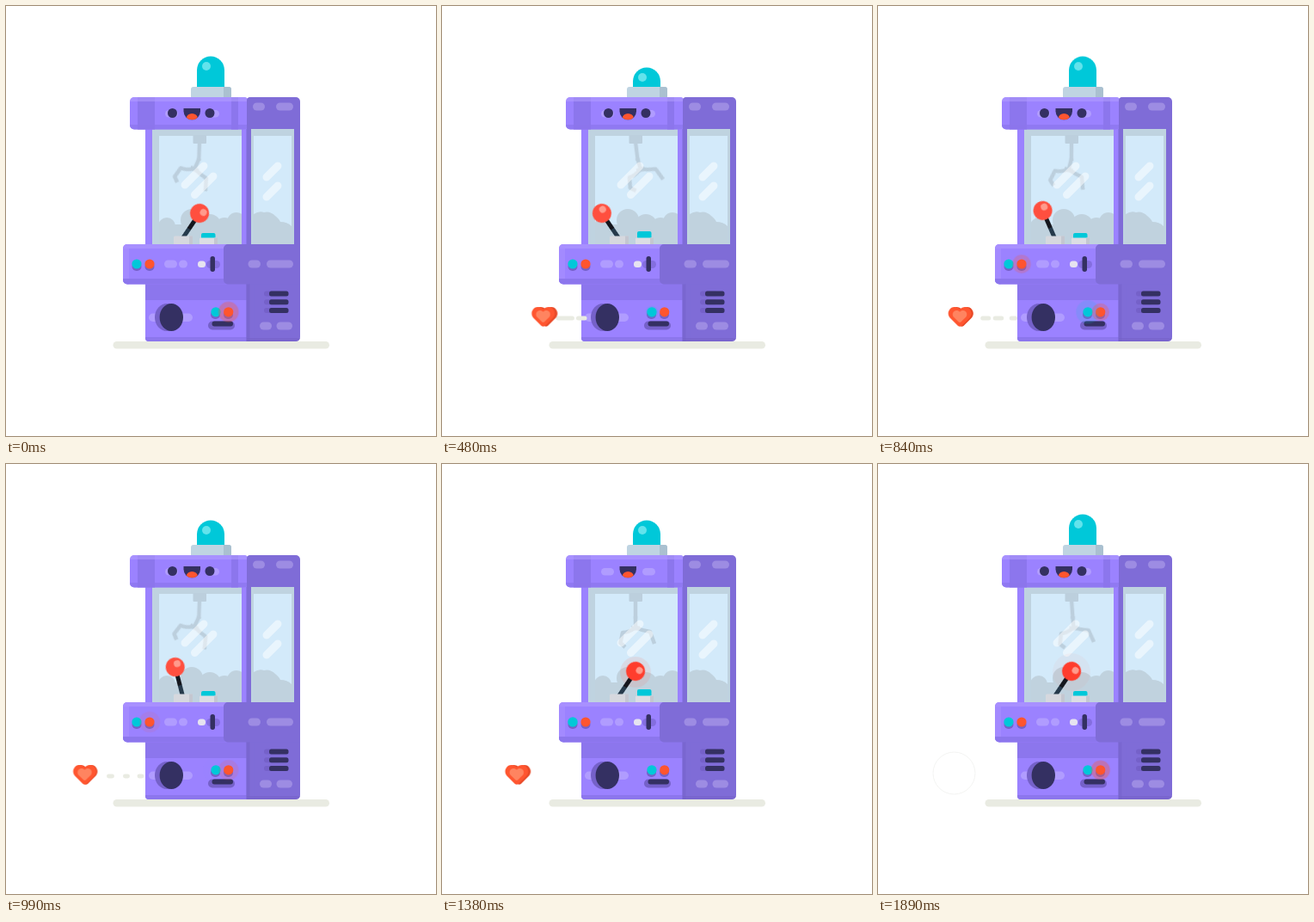
An HTML page without scripts that plays this animation: 500x500 px, repeating every 1.92 s.

```html
<!DOCTYPE html>
<html lang="en">
<head>
<meta charset="utf-8">
<title>Claw machine</title>
<style>
html, body { margin: 0; width: 100%; height: 100%; overflow: hidden; background: #fff; }
svg { display: block; width: 100vw; height: 100vh; }

.lit { fill: #9b82ff; }
.mid { fill: #8c76ed; }
.side { fill: #7f6cd7; }
.shade { fill: #7561c9; }
.pill { fill: #b09cff; }
.dim { fill: #9d8ce3; }
.ink { fill: #343062; }
.cyan { fill: #00c8d9; }
.red { fill: #ff552f; }
.frame { fill: #bfd3e0; }
.glass { fill: #d3eafa; }
.shine { stroke: #fff; stroke-width: 9; stroke-linecap: round; opacity: .5; }
.trail { stroke: #e9ebe2; stroke-linecap: round; stroke-width: 0; }

.dome, .eyes, .stick, .cable, .claw, .cap, .heart, .pop, .ring, .front, .glow, .halo, .ball {
  animation: 1.92s linear infinite;
}
.dome { animation-name: dome; animation-timing-function: ease-in-out; }
.eyes { animation-name: blink; transform-origin: 215px 124.5px; }
.stick { animation-name: stick; transform-origin: 205.5px 270px; animation-timing-function: ease-in-out; }
.ball { animation-name: ball; }
.halo { animation-name: halo; transform-origin: 225px 242px; opacity: 0; }
.cable { animation-name: cable; transform-origin: 225px 158px; animation-timing-function: ease-in-out; }
.claw { animation-name: claw; transform-origin: 225px 178px; animation-timing-function: ease-in-out; }
.cap { animation-name: cap; }
.heart { animation-name: heart; }
.pop { animation-name: pop; }
.front { animation-name: front; }
.ring { animation-name: ring; transform-origin: 88px 359.5px; }
.glow { opacity: 0; animation-name: glow; transform-box: fill-box; transform-origin: center; }

@keyframes dome {
  0% { transform: translateY(0); }
  16% { transform: translateY(16.5px); }
  25% { transform: translateY(13px); }
  35.94% { transform: translateY(5px); }
  43% { transform: translateY(0); }
  51.56% { transform: translateY(7px); }
  60% { transform: translateY(13px); }
  71.88% { transform: translateY(7px); }
  82%, 100% { transform: translateY(0); }
}
@keyframes blink {
  0%, 66% { transform: scaleY(1); }
  70%, 73% { transform: scaleY(0); }
  77%, 100% { transform: scaleY(1); }
}
@keyframes stick {
  0% { transform: rotate(34deg); }
  14.06% { transform: rotate(-25deg); }
  25% { transform: rotate(-34deg); }
  35.94% { transform: rotate(-32.5deg); }
  51.56% { transform: rotate(-14.5deg); }
  68%, 100% { transform: rotate(34deg); }
}
@keyframes ball {
  0%, 62% { fill: #ff4f3f; }
  70%, 98.5% { fill: #ff3d2d; }
  100% { fill: #ff4f3f; }
}
@keyframes halo {
  0%, 66% { opacity: 0; transform: scale(.5); }
  72% { opacity: .13; transform: scale(.9); }
  98.4% { opacity: .05; transform: scale(1.1); }
  100% { opacity: 0; transform: scale(1.1); }
}
@keyframes cable {
  0% { transform: rotate(2deg); }
  14.06% { transform: rotate(-4deg); }
  25% { transform: rotate(-7deg); }
  35.94% { transform: rotate(-2deg); }
  50% { transform: rotate(2deg); }
  71.88% { transform: rotate(0); }
  85% { transform: rotate(-5deg); }
  98.43%, 100% { transform: rotate(-4deg); }
}
@keyframes claw {
  0% { transform: rotate(22deg); }
  14.06% { transform: rotate(-1deg); }
  25% { transform: rotate(-9deg); }
  35.94% { transform: rotate(0); }
  50% { transform: rotate(24deg); }
  71.88% { transform: rotate(0); }
  85% { transform: rotate(-4deg); }
  98.43%, 100% { transform: rotate(-1deg); }
}
@keyframes cap {
  0%, 16% { transform: translateY(0); }
  24%, 28% { transform: translateY(-2px); }
  34%, 64% { transform: translateY(0); }
  71%, 77% { transform: translateY(-2px); }
  84%, 100% { transform: translateY(0); }
}
@keyframes heart {
  0%, 6.25% { transform: translate(191px, 361px); }
  9.38% { transform: translate(173px, 361px); }
  14.06% { transform: translate(151.5px, 361px); }
  17.97% { transform: translate(137px, 361px); }
  21.88% { transform: translate(126.5px, 361px); }
  25% { transform: translate(119.5px, 361px); }
  28.13% { transform: translate(114px, 361px); }
  35.94% { transform: translate(102.5px, 361px); }
  43.75% { transform: translate(96px, 361px); }
  51.56% { transform: translate(91.5px, 361px); }
  56.25% { transform: translate(90px, 361px); }
  71.88%, 100% { transform: translate(88.3px, 361px); }
}
@keyframes pop {
  0%, 6.25% { transform: scale(0); }
  12.5%, 76% { transform: scale(1); }
  79% { transform: scale(1.12); }
  84%, 100% { transform: scale(0); }
}
@keyframes front {
  0%, 35.94% { transform: translateX(-1.8px); }
  51.56% { transform: translateX(0); }
  71.88%, 100% { transform: translateX(-1.5px); }
}
@keyframes ring {
  0%, 79% { opacity: 0; transform: scale(.3); }
  80% { opacity: 1; transform: scale(.5); }
  84.4% { opacity: .9; transform: scale(.85); }
  98.44% { opacity: .45; transform: scale(1); }
  100% { opacity: 0; transform: scale(1); }
}
@keyframes glow {
  0% { opacity: 0; transform: scale(.4); }
  6% { opacity: .4; transform: scale(.6); }
  14% { opacity: .28; transform: scale(.85); }
  30%, 100% { opacity: 0; transform: scale(1.1); }
}
</style>
</head>
<body>
<svg viewBox="0 0 500 500" xmlns="http://www.w3.org/2000/svg">
  <defs>
    <path id="love" d="M-2 11 L-11.5 1.5 C-16 -4 -11.5 -11 -6.5 -11 C-3.5 -11 -1.5 -10 0 -8 C1.5 -10 3.5 -11 6.5 -11 C11.5 -11 16 -4 11.5 1.5 L2 11 Q0 12.6 -2 11Z"/>
    <clipPath id="above"><rect x="210" y="50" width="60" height="45"/></clipPath>
    <clipPath id="mouth"><path d="M206.5 119h19.5v3.5a9.75 9.75 0 0 1-19.5 0z"/></clipPath>
    <clipPath id="pane"><rect x="178" y="151" width="96" height="126"/></clipPath>
    <clipPath id="head"><rect x="144" y="106" width="138" height="37.5" rx="5"/></clipPath>
    <clipPath id="panel"><rect x="136" y="277" width="124" height="46.5" rx="5"/></clipPath>
  </defs>

  <rect x="124.500" y="390" width="251.500" height="8.500" rx="4.250" fill="#e9ebe2"/>

  <!-- lamp -->
  <g clip-path="url(#above)">
    <g class="dome">
      <path class="cyan" d="M222 120V74.500a16 16 0 0 1 32 0V120z"/>
      <circle cx="233" cy="70" r="5" fill="#62e3ec"/>
    </g>
  </g>
  <rect x="215" y="94" width="47" height="16" rx="3" fill="#bfd4e2"/>
  <path d="M253 94h6a3 3 0 0 1 3 3v12h-9z" fill="#aac0d0"/>

  <!-- cabinet -->
  <rect class="lit" x="162" y="130" width="124" height="260" rx="4"/>
  <rect class="mid" x="162" y="323" width="118" height="19"/>
  <path class="mid" d="M162 385h118v5h-114a4 4 0 0 1-4-4z"/>
  <rect class="side" x="280" y="106" width="62" height="284" rx="5"/>
  <rect class="side" x="279.500" y="143" width="10" height="247"/>
  <rect class="shade" x="279.500" y="323" width="4" height="67" opacity=".5"/>
  <path class="shade" d="M280 386h62a5 5 0 0 1-5 4h-57z" opacity=".6"/>

  <!-- windows -->
  <rect class="frame" x="170" y="143" width="104" height="134"/>
  <rect class="glass" x="178" y="151" width="96" height="126"/>
  <rect class="frame" x="285" y="143" width="50" height="134"/>
  <rect class="glass" x="288" y="151" width="44" height="126"/>
  <g fill="#c0d2de">
    <g clip-path="url(#pane)">
      <circle cx="187" cy="256" r="10"/>
      <circle cx="216" cy="249" r="13"/>
      <circle cx="237" cy="255" r="13"/>
      <circle cx="254" cy="257" r="11"/>
      <circle cx="268" cy="251" r="11"/>
      <rect x="178" y="254" width="96" height="23"/>
    </g>
    <path d="M288 242q6-4 12-2q7-2 13 4q5 4 6 7q8 0 13 5v21h-44z"/>
  </g>

  <g fill="none" stroke="#bccfdd" stroke-width="4.500" stroke-linejoin="round">
    <g class="cable">
      <path d="M225 158V180"/>
      <g class="claw">
        <path d="M225 177V190M213 213L207.500 208L210 196Q217 196 225 190Q233 194 242 195L247 209"/>
        <path d="M220 191h10" stroke-width="5"/>
      </g>
    </g>
  </g>
  <rect x="217.500" y="150" width="15.500" height="10" rx="1" fill="#bccfdd"/>
  <g class="shine">
    <path d="M208 208L230 186M219.500 219.500L241 198M303 199L316 186M303 222L316 209"/>
  </g>

  <!-- head and face -->
  <g clip-path="url(#head)">
    <rect class="lit" x="144" y="106" width="138" height="38"/>
    <rect class="mid" x="153" y="106" width="20" height="38"/>
    <rect class="mid" x="262" y="106" width="8" height="38"/>
    <rect x="144" y="106" width="138" height="5" fill="#b39fff" opacity=".55"/>
    <rect class="mid" x="144" y="138" width="138" height="6" opacity=".7"/>
  </g>
  <path class="side" d="M285 106h-1a4 4 0 0 0-4 4v33h10v-37z"/>
  <rect class="pill" x="185" y="121" width="15" height="8.500" rx="4.250"/>
  <rect class="pill" x="233" y="121" width="15" height="8.500" rx="4.250"/>
  <g class="eyes ink">
    <circle cx="193.500" cy="124.500" r="5.500"/>
    <circle cx="237" cy="124.500" r="5.500"/>
  </g>
  <g clip-path="url(#mouth)">
    <rect class="ink" x="206" y="118" width="21" height="15"/>
    <ellipse class="red" cx="216.300" cy="130.500" rx="6.500" ry="5.500"/>
  </g>
  <g class="dim">
    <rect x="287" y="112.500" width="14" height="9" rx="4.500"/>
    <rect x="314" y="112.500" width="20" height="9" rx="4.500"/>
  </g>

  <!-- joystick and push button -->
  <circle class="halo" cx="225" cy="242" r="20" fill="#ff6a50"/>
  <g class="stick">
    <path d="M205.500 272V254" stroke="#263a4b" stroke-width="5"/>
    <path d="M205.500 257V240" stroke="#14161d" stroke-width="5"/>
    <circle class="ball" cx="205.500" cy="235" r="11"/>
    <circle cx="208.700" cy="231.700" r="4" fill="#ff9a8c"/>
  </g>
  <rect x="195" y="267.500" width="22" height="10" rx="1.500" fill="#d6d8de"/>
  <rect x="213" y="267.500" width="4" height="10" fill="#c4c7d0"/>
  <rect class="cap cyan" x="227" y="264" width="16.500" height="9" rx="2"/>
  <rect x="225" y="269.500" width="21" height="8" rx="1.500" fill="#dcdee3"/>
  <rect x="242" y="269.500" width="4" height="8" fill="#c4c7d0"/>

  <!-- control panel -->
  <g clip-path="url(#panel)">
    <rect class="lit" x="136" y="277" width="124" height="47"/>
    <rect x="136" y="277" width="124" height="5" fill="#a890ff"/>
    <rect x="136" y="277" width="7" height="47" fill="#a890ff" opacity=".6"/>
    <rect class="mid" x="136" y="317" width="124" height="7"/>
  </g>
  <path class="side" d="M342 277h-84a5 5 0 0 0-5 5v36.500a5 5 0 0 0 5 5h84z"/>
  <g class="shade">
    <rect x="146.500" y="298" width="11" height="10" rx="5"/>
    <rect x="161.500" y="298" width="11" height="10" rx="5"/>
    <rect x="233" y="296" width="16" height="9" rx="4.500" opacity=".6"/>
  </g>
  <circle class="cyan" cx="152" cy="300" r="5.600"/>
  <circle class="red" cx="167" cy="300" r="5.600"/>
  <rect class="pill" x="184" y="295.500" width="15" height="9" rx="4.500"/>
  <rect class="pill" x="201" y="295.500" width="10" height="9" rx="4.500"/>
  <rect x="223" y="296.500" width="9" height="7.500" rx="3.500" fill="#e6e3f0"/>
  <rect class="ink" x="237.500" y="291" width="5.500" height="18" rx="2.700"/>
  <g class="dim">
    <rect x="281.500" y="295.500" width="14.500" height="9" rx="4.500"/>
    <rect x="303" y="295.500" width="31" height="9" rx="4.500"/>
    <rect x="295" y="367.500" width="14" height="9" rx="4.500"/>
    <rect x="314.500" y="367.500" width="18.500" height="9" rx="4.500"/>
  </g>
  <g class="shade">
    <rect x="300" y="331.500" width="20" height="6" rx="3"/>
    <rect x="300" y="341.300" width="20" height="6" rx="3"/>
    <rect x="300" y="351" width="20" height="6" rx="3"/>
  </g>
  <g class="ink">
    <rect x="306" y="331.500" width="22.500" height="6" rx="2.500"/>
    <rect x="306" y="341.300" width="22.500" height="6" rx="2.500"/>
    <rect x="306" y="351" width="22.500" height="6" rx="2.500"/>
  </g>

  <!-- prize hole and lower buttons -->
  <rect class="pill" x="166" y="357.500" width="51" height="9.500" rx="4.700"/>
  <ellipse class="shade" cx="187" cy="362" rx="14" ry="16"/>
  <ellipse class="ink" cx="192.300" cy="362" rx="13.700" ry="16"/>
  <g class="shade">
    <rect x="238" y="354" width="11" height="10" rx="5"/>
    <rect x="253" y="354" width="11" height="10" rx="5"/>
    <rect x="235" y="366.500" width="31" height="10" rx="5"/>
  </g>
  <circle class="cyan" cx="244" cy="355.800" r="5.600"/>
  <circle class="red" cx="258.700" cy="355.800" r="5.600"/>
  <rect class="ink" x="239.500" y="366.500" width="24.500" height="6" rx="3"/>

  <circle class="glow red" cx="167" cy="300" r="12" style="animation-delay:-1.4s"/>
  <circle class="glow cyan" cx="152" cy="300" r="10" style="animation-delay:-.65s"/>
  <circle class="glow cyan" cx="244" cy="355.800" r="14" style="animation-delay:-1.5s"/>
  <circle class="glow red" cx="258.700" cy="355.800" r="12" style="animation-delay:-1.35s"/>
  <circle class="glow red" cx="258.700" cy="355.800" r="16" style="animation-delay:-.2s"/>

  <!-- trail -->
  <line class="trail" x1="180" x2="180" y1="363" y2="363">
    <animate attributeName="x1" dur="1.92s" repeatCount="indefinite" keyTimes="0;.09;.1406;.25;.3594;.5156;.58;1" values="180;180;166;135;124;119.5;118;118"/>
    <animate attributeName="x2" dur="1.92s" repeatCount="indefinite" keyTimes="0;.09;.1406;.25;.3594;.5156;.58;1" values="180;180;181;151.5;134;123.5;118;118"/>
    <animate attributeName="stroke-width" dur="1.92s" repeatCount="indefinite" keyTimes="0;.08;.1;.5156;.58;1" values="0;0;5;5;0;0"/>
  </line>
  <line class="trail" x1="146" x2="146" y1="363" y2="363">
    <animate attributeName="x1" dur="1.92s" repeatCount="indefinite" keyTimes="0;.25;.3594;.5156;1" values="150;150;134;138.5;138.5"/>
    <animate attributeName="x2" dur="1.92s" repeatCount="indefinite" keyTimes="0;.25;.3594;.5156;1" values="151;151;146;141.500;138.5"/>
    <animate attributeName="stroke-width" dur="1.92s" repeatCount="indefinite" keyTimes="0;.25;.27;.5156;.57;1" values="0;0;5;5;0;0"/>
  </line>
  <line class="trail" x1="166" x2="166" y1="363" y2="363">
    <animate attributeName="x1" dur="1.92s" repeatCount="indefinite" keyTimes="0;.17;.25;.3594;.5156;1" values="168;168;158.5;155.5;155;155"/>
    <animate attributeName="x2" dur="1.92s" repeatCount="indefinite" keyTimes="0;.17;.25;.3594;.5156;1" values="179;179;166;161;158;155"/>
    <animate attributeName="stroke-width" dur="1.92s" repeatCount="indefinite" keyTimes="0;.15;.18;.5156;.56;1" values="0;0;5;5;0;0"/>
  </line>

  <!-- prize -->
  <g class="heart">
    <g class="pop">
      <use href="#love" x="1.500" fill="#e84a28"/>
      <g class="front">
        <use href="#love" fill="#ff5630"/>
        <use href="#love" transform="translate(0 -.3) scale(.62)" fill="#ff8460"/>
      </g>
    </g>
  </g>
  <circle class="ring" cx="88.500" cy="359.500" r="24.500" fill="none" stroke="#e3e4e0" stroke-width="1"/>
</svg>
</body>
</html>
```
